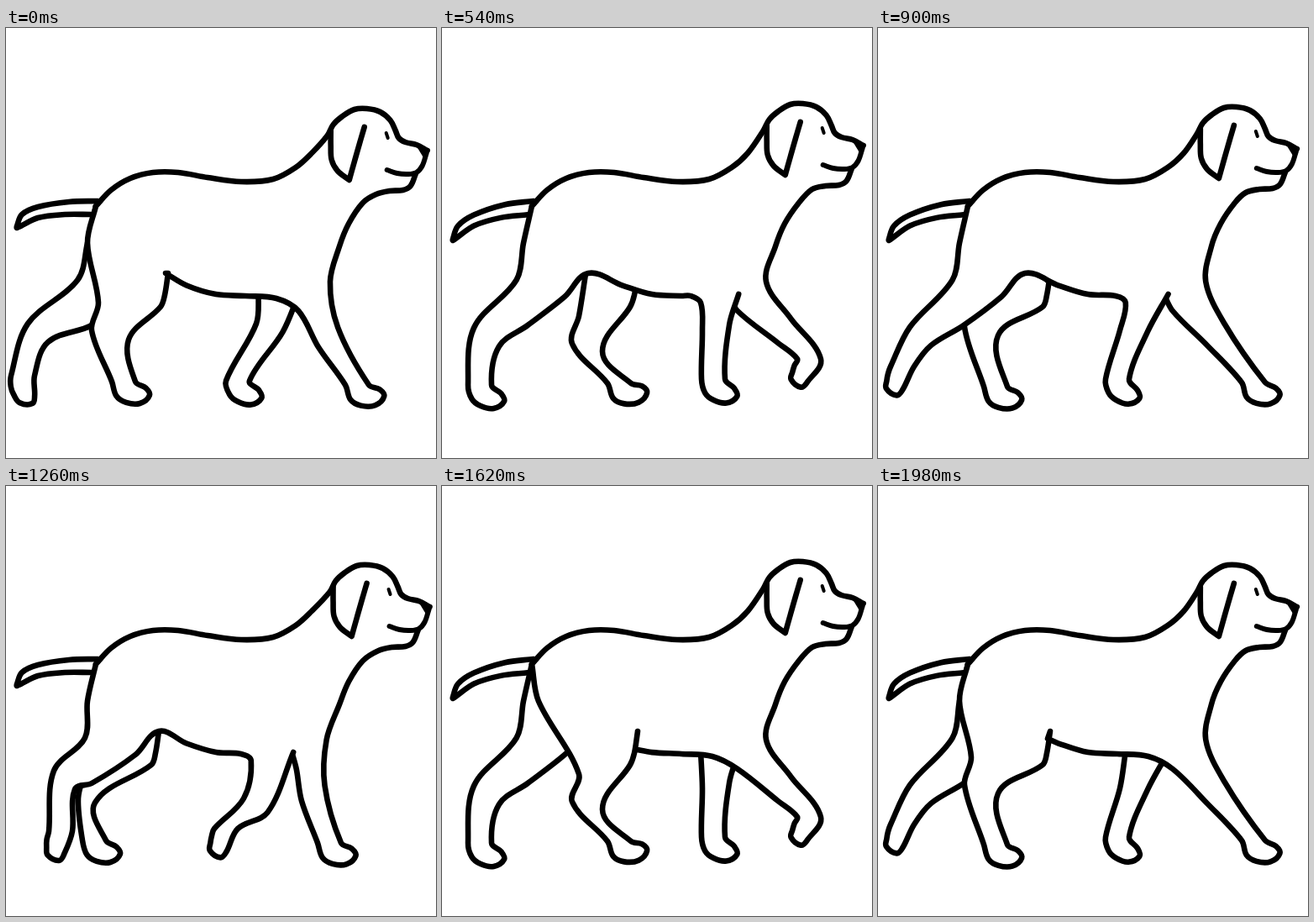
Recreate the animation shown at these times as an HTML page with a canvas. Size 512x512 px, loop 2.16 s.

```html
<!DOCTYPE html>
<html lang="en">
<head>
<meta charset="utf-8">
<title>Walking dog</title>
<style>
  html, body { margin: 0; width: 100%; height: 100%; overflow: hidden; background: #fff; }
  canvas { display: block; width: 512px; height: 512px; }
</style>
</head>
<body>
<canvas id="stage" width="512" height="512"></canvas>
<script>
const ctx = document.getElementById('stage').getContext('2d');
const STEP = 180, STEPS = 12;

const parse = text => text.split(' ').map(p => p.split(',').map(Number));
const shift = (pts, [dx, dy]) => pts.map(([x, y]) => [x + dx, y + dy]);
const corner = (x, y) => [[x, y], [x, y]];

const BACK = parse('107,212 125,193 148,179 175,172 205,172 240,178 280,183 318,180 345,166 364,149');
const SKULL = parse('382,128 389,115 400,105 414,97 429,96 445,100 457,110 463,122 467,131 475,136 488,139 501,146');
const CHIN = parse('440,198 456,194 472,193 481,188 487,174');
const CHEST = parse('397,260 408,233 425,208');
const MOUTH = parse('453,169 465,173 478,174 488,172 495,164 500,149');
const EAR = parse('386,122 386,140 387,157 394,170 408,181 408,181 415,156 421,135 426,118');
const EYE = parse('452,125 454,131');
const NOSE = parse('487,139 503,144 498,157');
const TAIL = parse('109,206 75,207 38,213 19,222 13,236 13,238 38,226 70,222 102,222');
const PAW = parse('-9,17 2,25 18,27 30,18 26,9');

// One stride of a leg; the far leg is half a stride behind.
// Hind: hock x, y, shin width, ankle x, y, paw tilt, groin x
const HIND = [
  [102, 360, 44, 140, 421, -3, 193], [86, 372, 20, 105, 422, -3, 182],
  [48, 358, 32, 59, 429, 5, 187], [38, 357, 30, 45, 425, 3, 174],
  [34, 354, 30, 33, 412, 45, 172], [38, 356, 25, 29, 403, 70, 175],
  [26, 352, 24, 20, 414, 40, 177], [57, 339, 25, 65, 411, 62, 182],
  [119, 356, 33, 153, 421, -8, 211], [155, 376, 36, 211, 423, -12, 233],
  [128, 366, 38, 178, 424, -8, 217], [103, 356, 40, 140, 427, -4, 205]
];
// Front: knee x, y, ankle x, y, paw tilt
const FRONT = [
  [372, 380, 418, 425, -8], [352, 375, 385, 425, -5],
  [323, 365, 350, 420, 0], [310, 360, 323, 418, 5],
  [298, 360, 305, 420, 5], [288, 360, 285, 418, 10],
  [298, 352, 276, 420, 5], [283, 372, 262, 408, 70],
  [368, 370, 397, 398, 70], [400, 375, 437, 394, 75],
  [392, 375, 443, 408, 30], [392, 378, 447, 422, -5]
];

const bellyY = x => 319 - 27 * ((290 - x) / 97) ** 3;

// Ankle and paw; the tilt grows from heel to toe.
function foot(x, y, tilt) {
  const paw = PAW.map(([px, py], i) => {
    const a = tilt * Math.PI / 180 * Math.min(1, (i + 2) / 4);
    return [x + px * Math.cos(a) - py * Math.sin(a), y + px * Math.sin(a) + py * Math.cos(a)];
  });
  return [[x - 14, y], ...paw, [x + 14, y]];
}

function hindLeg([hx, hy, width, ax, ay, tilt, groin], near) {
  const fore = hx > 80;
  const thigh = fore ? [hx + 8, hy - 33] : [78 + 0.28 * hx, 300];
  const hip = [97 + Math.max(0, thigh[0] - 112) * 0.35, 256];
  const top = near || !fore ? [[107, 212], hip] : [[thigh[0] + 8, thigh[1] - 50]];
  const front = fore
    ? [[groin - 9, 332], [groin - 4, 318], ...corner(groin, 292), ...corner(groin - 3, Math.max(292, bellyY(groin)))]
    : [[102, 354], [groin - 28, 320], [groin, 292]];
  return [...top, thigh, [hx, hy], ...foot(ax, ay, tilt),
    [hx + width, hy + (fore ? 0.25 * width : 22)], ...front];
}

function frontLeg([kx, ky, ax, ay, tilt], near, head) {
  const len = Math.hypot(ax - kx, ay - ky);
  const knee = [kx + 33 * (ay - ky) / len, ky - 33 * (ax - kx) / len];
  const leg = [[kx, ky], ...foot(ax, ay, tilt), knee];
  if (kx > 340) {
    const shoulder = [300 + 0.13 * kx, 337];
    return [near ? [322, 322] : [340, 316], shoulder, ...leg,
      [387 - 1.5 * head[0], 302], ...CHEST, ...shift(CHIN, head)];
  }
  const top = 122 + 0.6 * kx;
  const start = near ? [[top - 12, 319], [top, 327]] : [[top, 316]];
  return [...start, ...leg, [230 + 0.36 * knee[0], 317]];
}

// Smooth curve whose handles scale with the length of each span.
function trace(pts) {
  const dir = pts.map((p, i) => {
    const a = pts[Math.max(i - 1, 0)], b = pts[Math.min(i + 1, pts.length - 1)];
    const len = Math.hypot(b[0] - a[0], b[1] - a[1]) || 1;
    return [(b[0] - a[0]) / len, (b[1] - a[1]) / len];
  });
  ctx.beginPath();
  ctx.moveTo(...pts[0]);
  for (let i = 1; i < pts.length; i++) {
    const a = pts[i - 1], b = pts[i], u = dir[i - 1], v = dir[i];
    const h = Math.hypot(b[0] - a[0], b[1] - a[1]) / 3;
    ctx.bezierCurveTo(a[0] + u[0] * h, a[1] + u[1] * h, b[0] - v[0] * h, b[1] - v[1] * h, b[0], b[1]);
  }
}

function stroke(pts, width = 6.6) {
  trace(pts);
  ctx.lineWidth = width;
  ctx.stroke();
}

function drawHead(head) {
  stroke([...BACK, ...shift(SKULL, head)]);
  stroke(shift(EAR, head));
  stroke(shift(MOUTH, head), 6);
  stroke(shift(EYE, head), 4);
  ctx.fillStyle = '#000';
  ctx.beginPath();
  shift(NOSE, head).forEach(p => ctx.lineTo(...p));
  ctx.fill();
}

function drawBody(step, head) {
  const hind = hindLeg(HIND[step], true);
  const front = frontLeg(FRONT[step], true, head);
  const groin = HIND[step][6];
  const belly = [215, 250, 285]
    .filter(x => x > groin + 8 && x < front[0][0] - 3)
    .map(x => [x, bellyY(x)]);
  const outline = [...hind, ...belly, ...front];
  trace(outline);
  if (FRONT[step][0] < 340) ctx.lineTo(385, 245);
  ctx.lineTo(400, 200);
  ctx.lineTo(112, 207);
  ctx.fill();
  stroke(outline);
}

function draw(ms) {
  const step = Math.floor(ms / STEP) % STEPS;
  const far = (step + STEPS / 2) % STEPS;
  const beat = step % 6;
  const head = [0.7 + 3.3 * Math.sin(beat * Math.PI / 3), 2 * Math.abs(beat - 3) - 6];
  const droop = beat < 2 ? 0 : 15;

  ctx.fillStyle = '#fff';
  ctx.fillRect(0, 0, 512, 512);
  ctx.strokeStyle = '#000';
  ctx.lineCap = ctx.lineJoin = 'round';
  stroke(TAIL.map(([x, y]) => [x, y + droop * ((109 - x) / 96) ** 1.5]));
  stroke(hindLeg(HIND[far], false));
  stroke(frontLeg(FRONT[far], false, head));
  drawBody(step, head);
  drawHead(head);
}

const start = performance.now();
function tick() {
  draw(performance.now() - start);
  requestAnimationFrame(tick);
}
tick();
</script>
</body>
</html>
```
